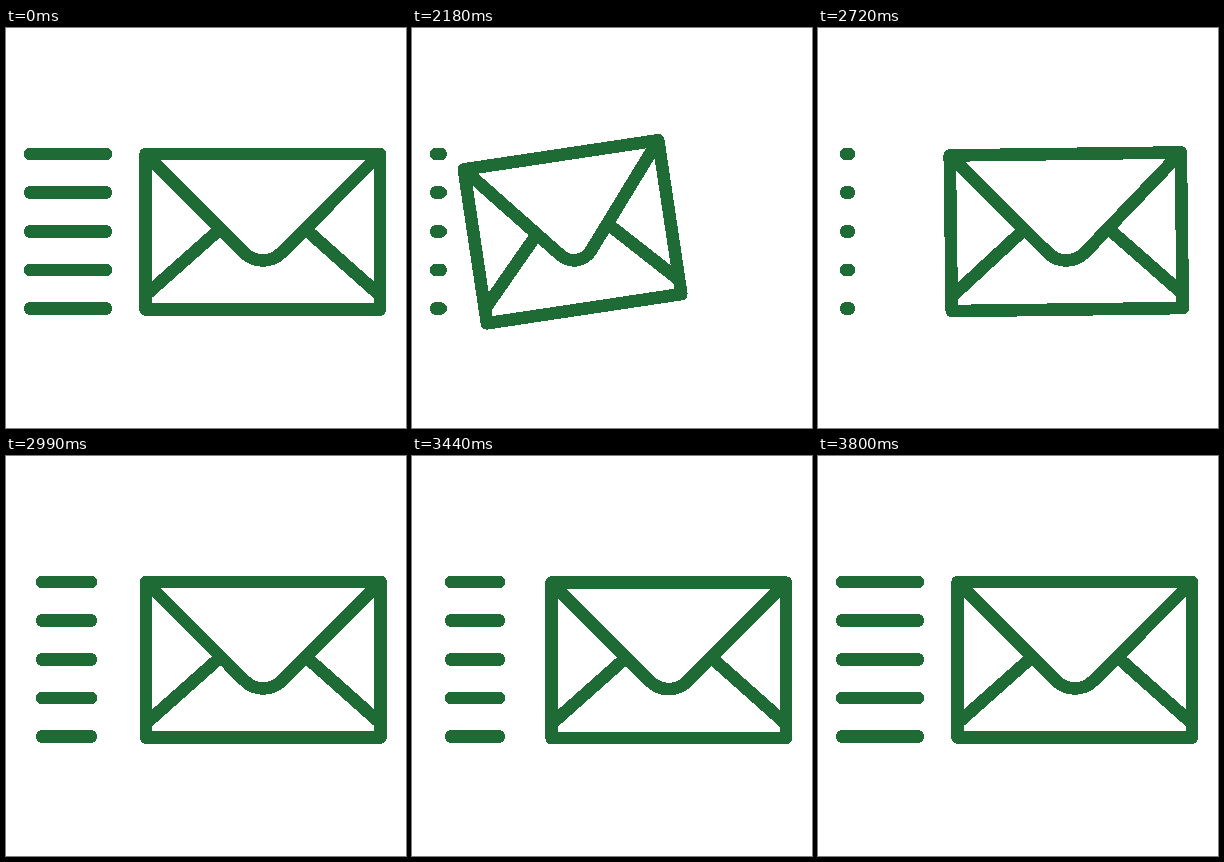
An HTML page that plays this animation: 400x400 px, repeating every 3830 ms.

```html
<!DOCTYPE html>
<html>
<head>
<meta charset="utf-8">
<style>
html, body { margin: 0; height: 100%; overflow: hidden; background: #fff; }
svg { display: block; width: 100vw; height: 100vh; }
path { vector-effect: non-scaling-stroke; shape-rendering: crispEdges; }
</style>
</head>
<body>
<svg viewBox="0 0 400 400" fill="none" stroke="#1e6b36" stroke-width="12.6" stroke-linecap="round" stroke-linejoin="round">
  <path id="lines"/>
  <!-- drawn around its own centre -->
  <g id="envelope">
    <path d="M-117.2-77.8H117.2V77.8H-117.2Z"/>
    <path d="M-117.2-77.7L-18.7 21A26.5 26.5 0 0 0 18.7 21L117.2-77.7"/>
    <path stroke-linecap="butt" d="M-43.5-2L-117.2 63.5M43.5-2L117.2 63.5"/>
  </g>
</svg>
<script>
const LOOP = 3830, PAUSE = 2000, STEP = 30;
const ROWS = [126, 164.5, 203.5, 242, 280.5];
// [step, left end, right end] of the speed lines after the launch
const STREAKS = [
  [20, 24, 24], [24, 28, 31], [29, 14, 108], [33, 36, 85], [37, 14, 108], [41, 38, 86],
  [44, 14, 108], [48, 39, 87], [51, 14, 108], [54, 39, 87], [57, 14, 108], [60, 24, 100]
];
const lines = document.getElementById('lines');
const envelope = document.getElementById('envelope');

function bezier(x1, y1, x2, y2) {
  const at = (a, b, s) => 3 * a * s * (1 - s) ** 2 + 3 * b * s * s * (1 - s) + s ** 3;
  return u => {
    if (u <= 0 || u >= 1) return u <= 0 ? 0 : 1;
    let lo = 0, hi = 1;
    for (let i = 0; i < 30; i++) {
      const mid = (lo + hi) / 2;
      if (at(x1, x2, mid) < u) lo = mid; else hi = mid;
    }
    return at(y1, y2, lo);
  };
}
const pullBack = bezier(.09, 1, .2, 1);
const launch = bezier(.35, .9, .1, 1);

function streak(n, pull) {
  if (n <= 20) return [24, n < 18 ? 100 - 76 * pull : 24];
  const i = STREAKS.findIndex(k => k[0] >= n);
  const a = STREAKS[i - 1], b = STREAKS[i];
  const e = (1 - Math.cos(Math.PI * (n - a[0]) / (b[0] - a[0]))) / 2;
  return [1, 2].map(j => a[j] + (b[j] - a[j]) * e);
}

function draw(now) {
  const n = Math.max(0, Math.floor((now % LOOP - PAUSE) / STEP));
  const pull = n < 18 ? pullBack(n / 18) : 1 - launch((n - 18) / 16);

  // slight rattle while the lines stream
  const shake = n > 28 && n < 58 ? .6 : 0;
  const dx = shake * Math.sin(n * Math.PI / 2) ** 2;
  const dy = shake * Math.cos(n * Math.PI / 2) ** 2;
  envelope.setAttribute('transform',
    `translate(${256.75 - 102.5 * pull + dx} ${203.75 + dy}) rotate(${-9.1 * pull}) scale(${1 - .172 * pull} 1)`);

  const [left, right] = streak(n, pull);
  lines.setAttribute('d', right - left < .5 ? '' : ROWS.map(y => `M${left} ${y}H${right}`).join(''));
}

const start = performance.now();
function tick() {
  draw(performance.now() - start);
  requestAnimationFrame(tick);
}
tick();
</script>
</body>
</html>
```
